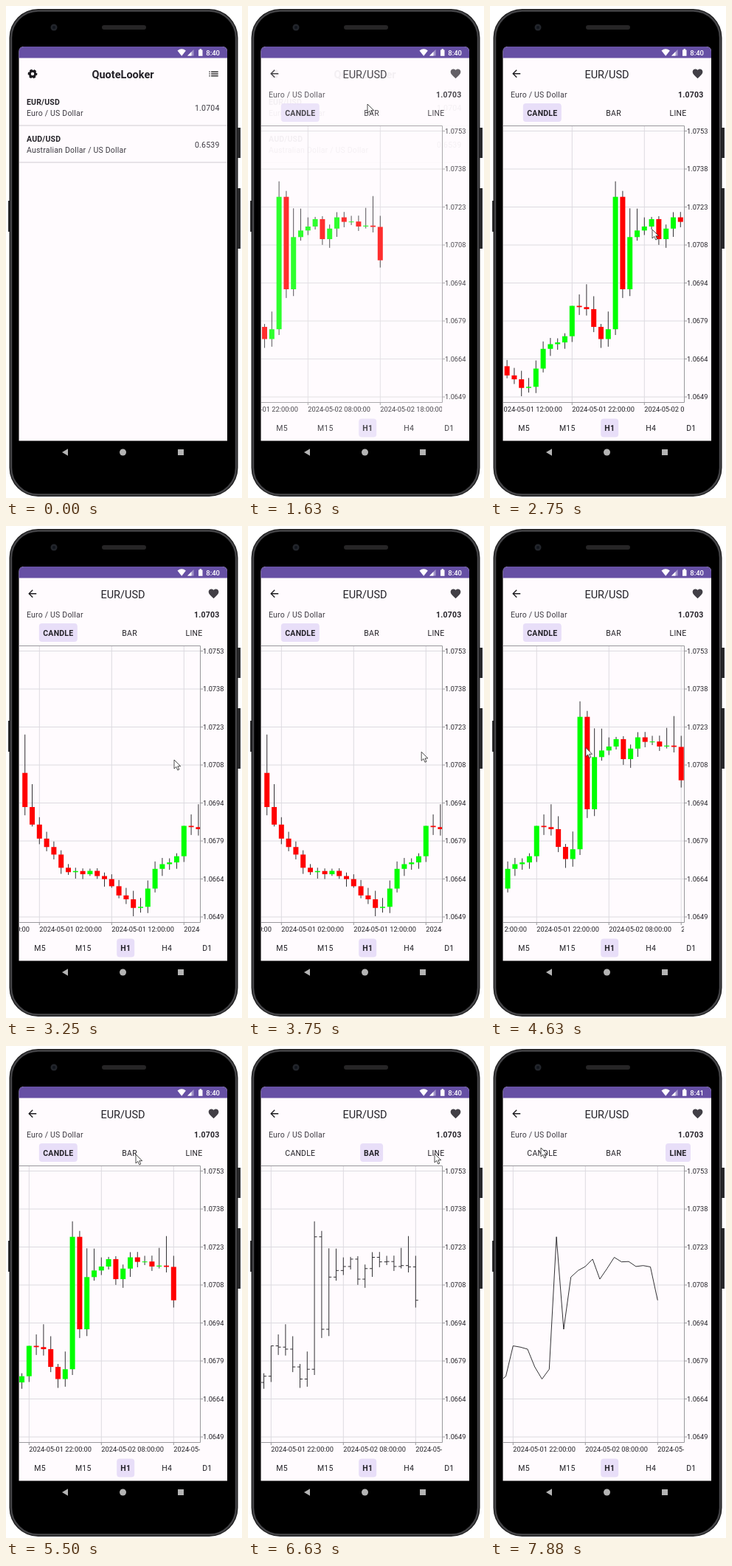
Write an HTML page that moves like this. It is 320 px wide and 667 px high and loops after 8000 ms.

```html
<!DOCTYPE html>
<html lang="en">
<head>
<meta charset="utf-8">
<title>Currency rates</title>
<style>
  html, body { margin: 0; width: 100%; height: 100%; overflow: hidden; background: #fff; }
  svg { display: block; width: 100%; height: 100%; }
  text { font: 10.5px Roboto, sans-serif; letter-spacing: .2px; fill: #242228; }
  .title { font-size: 14.5px; letter-spacing: 0; }
  .soft { fill: #3d3a42; }
  .axis { font-size: 9.25px; letter-spacing: 0; }
  .bold { font-weight: 700; }
  .mid { text-anchor: middle; }
  .end { text-anchor: end; }
  .clock { font-size: 9.5px; font-weight: 500; letter-spacing: 0; fill: #fff; }
  .pill { fill: #e8def8; }
  .grid { stroke: #dcdbe0; }
  .frame { stroke: #99989c; fill: none; }
  .ink { stroke: #1c1b1f; stroke-width: .9; fill: none; }
</style>
</head>
<body>
<svg viewBox="0 0 320 667">
  <defs>
    <clipPath id="screenClip"><path d="M17.500 589.500V62q0-7 7-7H293q7 0 7 7V589.500z"/></clipPath>
    <clipPath id="plotClip"><rect x="18" y="163" width="245" height="392"/></clipPath>
  </defs>

  <g id="phone">
    <path d="M3 264h3v42H3zM313 165h5v41h-5zM313 247h5v82h-5z" fill="#29292b"/>
    <rect x="4.500" y="4" width="310" height="661" rx="39" fill="#171718"/>
    <rect x="7" y="6.500" width="305" height="656" rx="36.500" fill="#000" stroke="#444447" stroke-width="2.500"/>
    <rect x="130" y="26" width="60" height="6" rx="3" fill="#262526"/>
    <circle cx="65" cy="29" r="4.500" fill="#22252b"/>
    <circle cx="65" cy="29" r="2" fill="#11151d"/>
    <g fill="#b4b4b4">
      <path d="M76 605l8-4.700v9.400z"/>
      <circle cx="158.500" cy="605" r="4.500"/>
      <rect x="233" y="601" width="8" height="8"/>
    </g>
  </g>

  <g clip-path="url(#screenClip)">
    <rect x="17" y="55" width="284" height="535" fill="#fffbfe"/>

    <g id="list">
      <g fill="none" stroke="#1c1b1f">
        <circle cx="36" cy="92" r="3.700" stroke-width="3"/>
        <circle cx="36" cy="92" r="5.400" stroke-width="1.800" stroke-dasharray="3.400 2.255" stroke-dashoffset="1.700"/>
      </g>
      <text class="title bold mid" x="158.500" y="97.500">QuoteLooker</text>
      <path transform="translate(273.300 83.800) scale(.686)" fill="#333"
        d="M3 7h2v2H3zM3 11h2v2H3zM3 15h2v2H3zM7 7h14v2H7zM7 11h14v2H7zM7 15h14v2H7z"/>
      <rect id="press" x="18" y="112" width="282" height="50" opacity=".06"/>
      <text class="bold" x="28" y="134">EUR/USD</text>
      <text class="soft" x="28" y="148.500">Euro / US Dollar</text>
      <text class="soft end" x="289.500" y="141.500">1.0704</text>
      <text class="bold" x="28" y="184">AUD/USD</text>
      <text class="soft" x="28" y="198.500">Australian Dollar / US Dollar</text>
      <text class="soft end" x="289.500" y="191.500">0.6539</text>
      <path d="M18 162H300M18 212H300" stroke="#cfcbd1"/>
    </g>

    <g id="detail">
      <path transform="translate(27.500 83.500) scale(.686)" fill="#1c1b1f"
        d="M20 11H7.830l5.590-5.590L12 4l-8 8 8 8 1.410-1.410L7.830 13H20z"/>
      <text class="title mid" x="158.500" y="97.500">EUR/USD</text>
      <path transform="translate(273.300 83.500) scale(.686)" fill="#423f46"
        d="M12 21.350l-1.450-1.320C5.400 15.360 2 12.280 2 8.500 2 5.420 4.420 3 7.500 3c1.740 0 3.410.810 4.500 2.090C13.090 3.810 14.760 3 16.500 3 19.580 3 22 5.420 22 8.500c0 3.780-3.400 6.860-8.550 11.540z"/>
      <text class="soft" x="28" y="124">Euro / US Dollar</text>
      <text class="bold end" x="289.500" y="124">1.0703</text>
      <g id="tabs"></g>
      <g id="priceAxis"></g>
      <g clip-path="url(#plotClip)">
        <g id="plot">
          <g id="timeGrid"></g>
          <g id="candle"></g>
          <g id="bar"></g>
          <g id="line"></g>
        </g>
      </g>
      <path class="frame" d="M18 162.500H263.500V537.500H18"/>
      <g id="periods"></g>
    </g>

    <rect x="17" y="55" width="284" height="15.500" fill="#6650a4"/>
    <g fill="#fff">
      <path d="M232.500 60.500q5.700-4.500 11.400 0l-5.700 7.200z"/>
      <path d="M246 67.500l8.500-8.500v8.500z" opacity=".4"/>
      <path d="M246 67.500l5.500-5.500v5.500z"/>
      <path d="M261 59.500h1.500v-1.200h2.500v1.200h1.500v8.200h-5.500z"/>
    </g>
    <text id="clock" class="clock end" x="290" y="66.500">8:40</text>
  </g>

  <path id="cursor" d="M0 0v12l2.800-2.600 2 4.600 2-.9-2-4.400h3.900z" fill="#fff" stroke="#222" stroke-width=".8"/>
</svg>

<script>
const LOOP = 8000, STEP = 125, HOURS = 43, GAP = 9.8;
const $ = id => document.getElementById(id);
const repeat = (count, make) => Array.from({ length: count }, (_, i) => make(i));

// Keys are [position, ...values]; values ease from one key to the next.
function at(keys, pos) {
  const next = keys.findIndex(k => k[0] > pos);
  if (next < 1) return keys.at(next).slice(1);
  const a = keys[next - 1], b = keys[next];
  const p = (pos - a[0]) / (b[0] - a[0]), e = p * p * (3 - 2 * p);
  return a.slice(1).map((v, i) => v + (b[i + 1] - v) * e);
}

// Turning points of the market: [hour, height of the close, upper wick].
const turns = [[-1, 336, 52], [0, 381, 52], [2, 426, 10], [6, 469, 5], [9, 470, 3],
  [16, 518, 12], [18, 464, 10], [21, 450, 4], [22, 405, 0], [24, 412, 31], [26, 454, 4],
  [27, 436, 24], [28, 260, 21], [29, 384, 8], [30, 312, 39], [33, 291, 3], [34, 315, 4],
  [36, 288, 7], [39, 297, 8], [41, 300, 40], [42, 343, 15]];
const random = seed => Math.abs(Math.sin(seed * 12.9898) * 43758.5453) % 1;
const closeAt = hour => at(turns, hour)[0] + 2.5 * Math.sin(hour * 2.6);

const bars = repeat(HOURS, hour => {
  const open = closeAt(hour - 1), close = closeAt(hour);
  const top = Math.min(open, close), bottom = Math.max(open, close);
  return {
    x: hour * GAP, open, close, top, bottom,
    high: top - at(turns, hour)[1], low: bottom + 2 + random(hour + 1) * 10
  };
});

const candleMark = ({ x, open, close, top, bottom, high, low }) =>
  `<path class="ink" d="M${x} ${high}V${low}"/>
   <rect x="${x - 3.5}" y="${top}" width="7" height="${Math.max(1, bottom - top)}" fill="${close < open ? '#0f0' : '#f00'}"/>`;
const barMark = ({ x, open, close, high, low }) =>
  `<path class="ink" d="M${x} ${high}V${low}M${x - 3.5} ${open}H${x}M${x} ${close}h3.5"/>`;

$('candle').innerHTML = bars.map(candleMark).join('');
$('bar').innerHTML = bars.map(barMark).join('');
$('line').innerHTML = `<path class="ink" d="M${bars.map(b => b.x + ' ' + b.close).join('L')}"/>`;

$('timeGrid').innerHTML = repeat(6, i => {
  const hour = i * 10 - 8, x = hour * GAP;
  const label = new Date(Date.UTC(2024, 4, 1, hour)).toISOString().slice(0, 19).replace('T', ' ');
  return `<path class="grid" d="M${x} 163V537"/><path class="frame" d="M${x} 537v4"/>
    <text class="axis" x="${x}" y="550">${label}</text>`;
}).join('');

$('priceAxis').innerHTML = repeat(8, i => {
  const y = 169.5 + i * 51.5;
  return `<path class="grid" d="M18 ${y}H263"/><path class="frame" d="M263 ${y}h4"/>
    <text class="axis" x="267" y="${y + 3.3}">${(1.0753 - i * .0104 / 7).toFixed(4)}</text>`;
}).join('');

const chip = (label, x, y, width, on) =>
  (on ? `<rect class="pill" x="${x - width / 2}" y="${y - 16.5}" width="${width}" height="25" rx="4"/>` : '') +
  `<text class="mid ${on ? 'bold' : ''}" x="${x}" y="${y}">${label}</text>`;

$('periods').innerHTML = ['M5', 'M15', 'H1', 'H4', 'D1']
  .map((label, i) => chip(label, 46 + i * 59.5 - i * i * .7, 576, 24, label === 'H1')).join('');

const tabs = [['candle', 70.8, 52], ['bar', 167.6, 31], ['line', 255, 34]];
function showMode(mode) {
  $('tabs').innerHTML = tabs
    .map(([name, x, width]) => chip(name.toUpperCase(), x, 148.5, width, name === mode)).join('');
  for (const [name] of tabs) $(name).style.display = name === mode ? '' : 'none';
}

const cursorKeys = [[625, 280, 57], [1250, 162, 133], [1625, 162, 133], [2250, 95, 300],
  [2750, 220, 303], [3250, 228, 317], [3875, 236, 305], [4125, 201, 302], [4875, 105, 300],
  [5500, 176, 147], [5750, 172, 145], [6625, 253, 146], [6875, 253, 146], [7625, 238, 230],
  [7875, 69, 138]];
const scrollKeys = [[2250, -232.3], [2750, -104.3], [3250, 25.7], [3860, 25.7], [4875, -184.3]];
const fadeKeys = [[1375, 1, 0], [1625, .05, .82], [1750, 0, 1]];

function draw(t) {
  const [x, y] = at(cursorKeys, t);
  const [listFade, detailFade] = at(fadeKeys, t);
  $('cursor').setAttribute('transform', `translate(${x} ${y})`);
  $('cursor').style.display = t < 625 ? 'none' : '';
  $('press').style.display = t < 1125 ? 'none' : '';
  $('list').style.opacity = listFade;
  $('detail').style.opacity = detailFade;
  $('plot').setAttribute('transform', `translate(${at(scrollKeys, t)[0]} 0)`);
  $('clock').textContent = t < 7750 ? '8:40' : '8:41';
  showMode(t < 5625 ? 'candle' : t < 6875 ? 'bar' : 'line');
}

let shown = -1;
const start = performance.now();
function tick() {
  const t = Math.floor((performance.now() - start) % LOOP / STEP) * STEP;
  if (t !== shown) draw(shown = t);
  requestAnimationFrame(tick);
}
tick();
</script>
</body>
</html>
```
